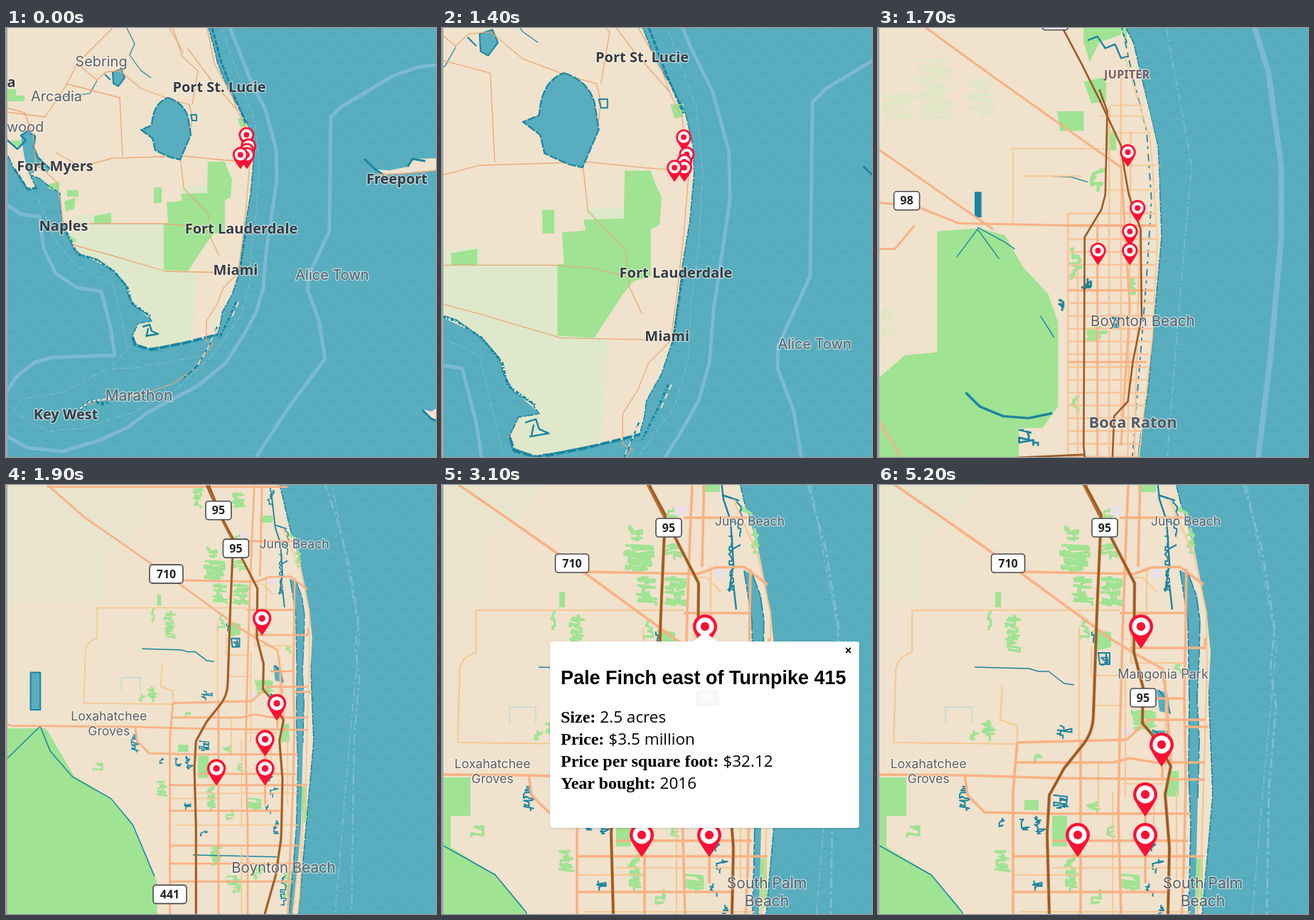
These frames come from a looping animation (605x603 px, 6 s). An HTML page with a canvas:

```html
<!DOCTYPE html>
<html lang="en">
<head>
<meta charset="utf-8">
<title>Map zoom</title>
<style>
html, body { margin: 0; width: 605px; height: 603px; overflow: hidden; background: #58adbf; }
canvas { position: absolute; left: 0; top: 0; }
#popup { position: absolute; left: 152px; top: 220px; width: 435px; height: 262px; background: #fff;
  border-radius: 4px; box-shadow: 0 1px 3px rgba(0,0,0,.15); opacity: 0; color: #000; }
#popup::before { content: ""; position: absolute; left: 200px; top: -14px;
  border: 18px solid transparent; border-top: 0; border-bottom: 15px solid #fff; }
h2 { position: absolute; left: 15px; top: 36px; margin: 0; white-space: nowrap;
  font: bold 27px/31px "Liberation Sans", Arial, sans-serif; }
p { position: absolute; left: 15px; top: 91px; margin: 0; white-space: nowrap;
  font: 24px/31px "Liberation Serif", Times, serif; }
p span { font: 22.5px/0 "Open Sans", sans-serif; }
#close { position: absolute; left: 415px; top: 3px; font: bold 16px/20px "Liberation Sans", Arial, sans-serif; }
#ghost { position: absolute; left: 205px; top: 68px; width: 33px; height: 23px; border-radius: 3px;
  background: #f7f7f7; color: #fff; text-align: center; font: 600 16px/23px "Noto Sans", sans-serif; }
</style>
</head>
<body>
<canvas id="map" width="605" height="603"></canvas>
<div id="popup">
  <div id="ghost">95</div>
  <div id="close">×</div>
  <h2>Pale Finch east of Turnpike 415</h2>
  <p><b>Size:</b> <span>2.5 acres</span><br><b>Price:</b> <span>$3.5 million</span><br>
  <b>Price per square foot:</b> <span>$32.12</span><br><b>Year bought:</b> <span>2016</span></p>
</div>
<script>
const ctx = document.getElementById('map').getContext('2d');
const popup = document.getElementById('popup');
const closeMark = document.getElementById('close');

const W = 605, H = 603, FOCUS = { x: 335, y: 164 };
const FAR = 0.0956, MID = 0.3413, NEAR = 1;
const LAND = '#f0e2cc', GREEN = '#9fe393', PALE = '#dfe8ca', SEA = '#58adbf', SHORE = '#1985a1';
const ORANGE = '#f9b184', YELLOW = '#f6c894', BROWN = '#9c5a26', LIMIT = '#7db9d2';

let k = 1;               // scale of the active layer
const useLayer = (scale, ref) => {
  k = scale / ref;
  ctx.setTransform(k, 0, 0, k, FOCUS.x * (1 - k), FOCUS.y * (1 - k));
};
const fill = (d, color) => { ctx.fillStyle = color; ctx.fill(new Path2D(d)); };
const line = (d, color, width, dash = []) => {
  ctx.strokeStyle = color;
  ctx.lineWidth = width / k;
  ctx.setLineDash(dash.map(v => v / k));
  ctx.stroke(new Path2D(d));
  ctx.setLineDash([]);
};
const random = seed => () => {
  seed = (seed * 16807 + 11) % 2147483647;
  return seed / 2147483647;
};

// Irregular patch filling a box: parks or ponds.
function patch(color, x, y, w, h) {
  const rnd = random(x * 977 + y * 131 + 7);
  const n = Math.max(4, Math.round(w * h / 50));
  let d = '';
  for (let i = 0; i < n; i++) {
    const px = x + rnd() * w, py = y + h * i / n;
    d += `${i ? 'L' : 'M'}${px} ${py}` + (rnd() < 0.5 ? `V${py + 5}` : `H${x + rnd() * w}`);
  }
  ctx.strokeStyle = color;
  ctx.lineWidth = color === GREEN ? 3.4 : 2;
  ctx.stroke(new Path2D(d));
}
const patches = (color, boxes) => boxes.split(' ').forEach(b => patch(color, ...b.split(',').map(Number)));

function drawSea() {
  ctx.setTransform(1, 0, 0, 1, 0, 0);
  ctx.fillStyle = SEA;
  ctx.fillRect(0, 0, W, H);
  ctx.strokeStyle = 'rgba(62,148,172,.18)';
  ctx.lineWidth = 2;
  ctx.beginPath();
  for (let row = 0; row < 44; row++)
    for (let x = -(row * 17 % 30); x < W; x += 30) {
      const y = row * 14 + 4;
      ctx.moveTo(x, y);
      ctx.quadraticCurveTo(x + 9, y + 6, x + 18, y + 1);
    }
  ctx.stroke();
}

function drawFar(showLimits) {
  if (showLimits) {
    line('M315 0L345 75L365 115L380 170L381 215L366 315L362 365L352 400L335 430L310 470L270 503L200 540L170 562L130 580L80 595L30 590L0 573', LIMIT, 5);
    line('M0 248L22 262L47 265L53 310L70 345L100 365L134 370L147 420L153 460L65 463L40 470L15 490L0 512', LIMIT, 5);
    line('M605 52L580 55L545 67L470 112L457 125L455 285L425 350V370L440 410L449 465L400 530L352 603', LIMIT, 5);
    line('M303 0L330 75L350 130L356 190L352 260L345 310L343 360L330 405L290 460L240 508L180 540L110 562L60 567L10 540L20 522L80 512L140 480L180 478L280 460', LIMIT, 1.3, [8, 3, 2, 3]);
    line('M45 240L70 300L100 335L150 358L160 400L172 450L150 475', LIMIT, 1.3, [8, 3, 2, 3]);
  }
  const coast = 'M-4 -4H284L292 25L298 50L312 85L328 112L340 135L347 165L348 190L344 235L338 270L333 310L328 345L318 375L304 400L302 415L298 430L280 437L250 442L225 447L200 451L180 443L178 432L186 415L205 412L198 402L182 392L172 375L168 360L152 342L128 325L104 318L94 308L86 292L80 275L77 255L76 232L60 222L48 212L34 206L42 224L32 229L12 200L3 180L-4 172Z';
  fill(coast, LAND);
  fill('M92 295L98 264L150 258L152 275L222 275V335L268 343L266 395L262 438L225 446L200 450L181 443L186 417L206 412L183 392L169 360L152 341L104 317Z', PALE);
  fill('M248 222H283V245H248ZM163 275H222V340L170 322Z', PALE);
  fill('M222 274H228L226 245L248 243L246 233L283 232L284 188H308L312 200L318 212L316 238L308 242V285L292 290L282 302L256 342L222 340Z', GREEN);
  fill('M208 224H219V246H208ZM86 228H102V237H86ZM124 264L148 260V275H124ZM2 86H14V95H26V103H2ZM58 220L75 216V229L60 226ZM82 244L98 238L96 254L84 258ZM326 127L338 126V138L330 140ZM7 158H24V166H10ZM86 290L100 298L90 304Z', GREEN);
  line('M290 0L302 45L322 98L338 135', SHORE, 3, [7, 2]);
  line(coast, SHORE, 1.6, [9, 2, 4, 1]);
  line('M338 280L332 320L328 350M324 385L314 408L300 436M80 276L100 318L128 326L152 342L171 365L176 386L203 405', SHORE, 3.2, [5, 2, 2, 3]);
  line('M178 434L182 446L204 452L250 443L298 431', SHORE, 4, [13, 3]);
  line('M192 420L202 417L205 426L214 430L196 433M200 422L198 432', SHORE, 2.4);
  fill('M21 151L30 145L41 152L39 168L45 182L62 198L58 203L36 191L40 203L32 206L26 182Z', SEA);
  line('M0 156L16 170L28 158L21 151L30 145L41 152L39 168L45 182L62 198', SHORE, 2.5);
  line('M12 198L30 226L44 225', SHORE, 3, [8, 2]);
  fill('M150 62L162 58L167 70L158 82L151 78Z', SEA);
  line('M139 65L147 73M150 62L162 58L167 70L158 82L151 78Z', SHORE, 2);
  line('M170 0L181 22L174 38L190 60L204 70M72 98L118 92L128 74', SHORE, 1.2);
  const roads = [
    'M0 112L26 119L38 150L42 190L70 215L77 245L80 275L220 275L255 278L285 285',
    'M95 305L150 320L225 342L318 344', 'M70 175L105 195L150 183L250 180L300 185L337 188',
    'M0 118L55 125L85 80L100 50L150 0M84 78L160 98L164 180', 'M100 50L128 73L140 62L160 60L190 85L225 98L258 108L262 125L258 155L245 180L250 225L285 262L288 295L300 320',
    'M235 0L248 40L270 60L262 108M255 28L290 75L325 115L337 140L343 190L338 250L331 310L326 345L306 365L296 390L282 412V440L292 445',
    'M230 0L250 35M283 0L293 50L318 95L325 115', 'M290 445L270 475L235 500L190 515L140 522L115 530'
  ];
  roads.forEach(d => line(d, '#eba877', 1.3));
  line('M297 420L286 447L270 474L250 492', SHORE, 2.4, [8, 4]);
  line('M296 423L284 450L268 476', LAND, 1.5, [8, 4]);
  line('M104 536L120 523L136 528L152 520', SHORE, 5, [4, 3]);
  line('M104 535L120 524L150 521', LAND, 2.5, [4, 3]);
  line('M327 385L316 410', LAND, 2, [8, 6]);
  const lake = 'M228 98Q250 105 256 125L260 150L245 185L232 182L210 172L206 155L190 143L205 137Q207 105 228 98Z';
  fill(lake, SEA);
  line(lake, SHORE, 2.2, [12, 2]);
  line('M260 122H268V130H262Z', SHORE, 2);
  const bahama = 'M504 184L520 199L540 200L565 195L572 184L605 183V200L580 202L548 205L528 208Z';
  fill(bahama, LAND);
  line('M504 184L520 199L532 207M565 195L572 184L590 187', SHORE, 3);
  line('M520 206L575 204L605 200', '#eba877', 1.3);
  fill('M587 536L598 539L605 535V553L595 545Z', LAND);
  line('M586 537L598 549L605 552', SHORE, 3);
}

function drawMid() {
  line('M371 -154L442 -11L462 0L490 90L503 185V260L492 380L475 520L463 603L446 703L431 881', LIMIT, 8);
  line('M355 -100L383 30L400 120L412 185L405 260L395 380L388 470L380 603L370 850', LIMIT, 1.8, [12, 4, 3, 4]);
  fill('M-250 -150H285L322 0L335 30L343 55L360 95L369 130L377 165L379 200L377 260L374 310L370 360L364 420L358 470L352 530L345 580L340 603L325 850H-250Z', LAND);
  fill('M0 295H153V375L75 405L50 380L0 330Z', '#eee3cb');
  patches('#e0e6c6', '130,78,40,60 180,95,30,40 90,110,40,30 60,330,50,30');
  fill('M-68 462H54V425L62 402L95 400L120 378L153 375V252L195 249L222 256L240 288L266 316L276 345V430L260 452H236V560L180 650L60 799H-68Z', GREEN);
  fill('M302 30L322 24L340 30V52L318 60L308 80L302 60ZM275 130H302V150H278ZM302 100L325 95V120L310 122ZM325 150H335V170H325Z', GREEN);
  patches(GREEN, '310,190,14,20 286,270,14,30 306,350,20,14 290,500,14,26 322,520,14,16 346,300,8,20 290,420,8,16');
  const lake = 'M-160 60L-100 -80L-20 -75L37 0L50 30L62 62L60 92L42 108L30 125L8 148L-20 158L-120 120Z';
  fill(lake, SEA);
  line(lake, SHORE, 1.2, [14, 2]);
  fill('M64 8L90 6L94 25L84 50H68Z', SEA);
  fill('M191 212H198V238H191ZM71 4H78V10H71Z', SHORE);
  line('M182 416L196 430L220 440L246 442L270 437', SHORE, 3.4);
  line('M173 278L194 250L216 280M194 248L220 262L232 270M268 196L290 197L306 202M0 235L20 206M258 338L272 360', SHORE, 1.4);
  line('M306 58L316 54L324 66L334 62L340 76L348 74', SHORE, 2.4);
  patches(SHORE, '236,454,20,18 276,322,8,8 300,300,10,12 302,484,12,12 330,340,10,12 295,550,16,14 325,495,8,14');
  line('M340 40L352 95L366 150L371 220L366 300L358 400L350 500L336 590', SHORE, 1.8, [10, 6, 4, 7]);

  let grid = '';
  for (let i = 0; i < 29; i++) {
    const y = 234 + i * 13;
    grid += `M${y > 482 ? 236 : 286} ${y}H${376 - Math.max(0, y - 300) * 0.1}`;
  }
  grid += 'M286 234V603M296 290V600M316 240V600M328 125V590M340 90V440M350 150L346 580M360 220L352 540M248 484V603M260 484V603M272 484V603';
  line(grid, '#f8c49a', 2.6);
  line('M228 168H325M230 170V245M318 135H362M330 124H364M326 152H370M340 185H380M240 196H300M325 210H378M344 75L370 160L377 260L372 360L356 500', YELLOW, 1.8);
  ['M62 -60L64 60L48 118L38 155L0 285', 'M52 140L210 250', 'M70 -10L100 15L210 95L340 187',
   'M-60 220L80 222L130 226L175 244L285 246H375', 'M0 232L60 240L80 270H110L130 246', 'M7 250V325L75 415L125 495L138 530L152 577L170 603',
   'M286 312H372M286 385H366M240 521H350M240 575H342M316 246V600M340 185L349 330L340 470'
  ].forEach(d => line(d, ORANGE, 3));
  ['M240 -40L258 0L275 35L300 82L318 118L340 165L343 187L348 215L360 250L361 340L352 385L347 425L333 440L331 490L318 540L305 603L290 850',
   'M318 108L326 130L324 215L320 230L303 258L302 470L306 515L280 560L277 603V850', 'M-60 575L152 577L180 583L205 592L235 548V482L303 479',
   'M205 592L198 603'
  ].forEach(d => line(d, BROWN, 2.6));
}

function drawNear(s) {
  const size = Math.pow(s, 0.8);
  line('M440 -300L494 -63L515 0L540 90L558 200L552 260L560 310L550 430L547 603L545 771L530 1000', '#7dbdd0', 3 * size, [14, 5, 4, 5]);
  const coast = 'M-230 -110H376L390 -63L414 0L430 38L445 90L455 140L463 185L468 235L465 290L463 410L458 420L457 525L452 603L430 780L425 900H-230Z';
  fill(coast, LAND);
  fill('M-230 172L0 165L62 160V75L110 45L145 0V-110H-230Z', '#e9e4cd');
  fill('M-230 411H-52L3 504L12 509L75 548L112 590L165 711V900H-230Z', GREEN);
  if (s > 0.78) fill('M-60 411H40V465H12V512H-60Z', GREEN);
  fill('M303 203L328 207V228L310 232L303 222ZM245 465H266V508H245ZM206 443H226V457H206ZM165 150H173V172H165ZM408 402H423V438H406ZM366 -4H391V10H366ZM447 525H457V590L448 600Z', GREEN);
  patches(GREEN, '262,57,22,20 256,85,42,34 316,34,18,16 315,82,24,20 273,130,32,36 312,130,34,40 153,178,10,26 180,182,20,52 283,190,14,26 356,316,36,28 146,330,18,28 130,345,14,16 165,515,20,30 262,520,20,50 340,548,28,22 292,446,20,14 40,478,20,14 320,480,14,18 300,570,16,20 220,380,12,10 415,250,12,14');
  patches(GREEN, '420,30,16,14 436,60,10,40 236,-60,20,40 310,-50,26,30 270,640,22,40 300,700,30,30 350,680,24,24 410,690,20,50');
  fill('M327 30H343V43H327ZM385 118H398V130H385ZM343 342H356V352H343Z', '#eadfe9');

  fill('M425 120L437 126L448 155L453 190L452 235L449 300L452 360L450 440L448 520L446 603L430 780L420 780L437 603L440 480L437 400L438 300L436 190Z', SEA);
  line('M425 120L436 190L438 300L437 400L440 480L437 603L424 770M437 126L448 155L453 190L452 235L449 300L452 360L450 440', SHORE, 1.6 * size, [20, 3, 8, 2]);
  line('M388 -50L396 20L406 50L410 110L404 150M394 14L418 22M406 50L420 56M409 90L420 84M410 140L414 175', SHORE, 2.4 * size);
  fill('M392 288L407 292L412 322L396 318ZM384 345H410V358H390ZM-82 302H-63V375H-82Z', SEA);
  line('M395 288L404 300L411 321M386 344L408 357M-82 302H-63V375H-82ZM310 236H326V252H312Z', SHORE, 2);
  patches(SHORE, '312,236,14,20 251,338,22,16 113,424,18,36 166,468,12,14 199,470,14,18 220,465,16,28 244,436,24,20 216,556,16,12 386,526,18,18 298,206,6,20 402,72,10,80 414,24,8,50 376,560,12,18 384,495,10,20');
  patches(SHORE, '380,-60,14,40 250,610,18,12 390,590,14,30 406,700,12,60');
  line('M136 256L212 258L226 262H240L262 279L276 281M-128 470L-63 407L-44 455L0 506L75 548L118 600L160 700M235 658L400 662', SHORE, 1.5);
  line('M95 312H132V336M95 312V336', '#a9d4df', 1);

  [ 'M48 176H340M48 176V235Q25 243 25 262L22 362L195 364', 'M175 283L172 330L196 338V362', 'M300 228V268H345M303 310H345M283 200V360',
    'M378 115V182M392 150L372 130H360M356 205V250H430M405 270V400M410 20L445 100L462 180L463 260L458 420L454 560L430 771',
    'M330 430V603M310 390V460M388 430V500M420 430V560M245 538H440M190 548H285M345 420H400M200 600H440M330 640V780M348 260V440'
  ].forEach(d => line(d, YELLOW, 2.2 * size));
  [ 'M-140 -140L-48 -63L24 0L85 42L185 112L330 218L360 236L400 258L406 300L412 390', 'M-50 -60H420M340 46H430M200 122L360 125L385 116L425 115L458 140',
    'M340 180H434M355 229H460V215', 'M195 362L350 358L380 330H460M195 390H330L355 384L390 390H460', 'M-230 362L-150 395L-120 406L120 408L250 412L460 414',
    'M122 408L126 436L150 460L240 462H440', 'M190 522H458M245 500H436M190 572H410M190 640H440M190 710H430M190 675H430',
    'M355 -63L350 46L345 180L340 360L338 462L342 603V780', 'M370 -60L366 115M434 118L431 300L433 420L430 540L420 780',
    'M196 362L190 430V780M285 360V780M376 455V560M400 395V415M378 180L370 229M386 300H432M432 340H465'
  ].forEach(d => line(d, ORANGE, 3.6 * size));
  ['M262 -63L290 0L361 138L360 235L373 285L372 335L385 350L412 395L404 435L410 510L408 603L407 628L397 697L376 771L350 900',
   'M266 -63L294 5L314 42L308 180L303 325Q302 350 286 368L262 398L241 436L238 490L241 603V900'
  ].forEach(d => {
    line(d, '#cf955f', 4.6 * size);
    line(d, BROWN, 3.2 * size);
  });
}

const CITY = ['600', '"Noto Sans", sans-serif', '#363c45'];
const SOFT_CITY = ['600', '"Noto Sans", sans-serif', '#555b64'];
const TOWN = ['400', 'Inter, sans-serif', '#59616b'];
const DISTRICT = ['600', '"Noto Sans", sans-serif', '#7d5a60'];

function label(text, x, y, size, [weight, family, color]) {
  ctx.font = `${weight} ${size}px ${family}`;
  ctx.lineWidth = 3;
  ctx.strokeStyle = 'rgba(255,250,242,.5)';
  ctx.fillStyle = color;
  const rows = text.split('\n');
  rows.forEach((row, i) => {
    const rowY = y + (i - (rows.length - 1) / 2) * size * 1.2;
    ctx.strokeText(row, x, rowY);
    ctx.fillText(row, x, rowY);
  });
}
function shield(text, x, y) {
  const w = text.length * 11 + 14;
  ctx.beginPath();
  ctx.roundRect(x - w / 2, y - 13, w, 26, 4);
  ctx.fillStyle = '#fff';
  ctx.fill();
  ctx.strokeStyle = '#4a4a4a';
  ctx.lineWidth = 1.6;
  ctx.stroke();
  ctx.font = '600 16px "Noto Sans", sans-serif';
  ctx.fillStyle = '#222';
  ctx.fillText(text, x, y + 1);
}

const farLabels = [
  ['Sebring', 134, 48, 20, TOWN], ['Arcadia', 71, 97, 20, TOWN], ['Englewood', 1, 140, 20, TOWN],
  ['Alice Town', 459, 348, 20, TOWN], ['Marathon', 187, 518, 21, TOWN], ['Sarasota', -30, 77, 20, CITY],
  ['Port St. Lucie', 300, 84, 20, CITY], ['Fort Myers', 69, 195, 20, CITY], ['Naples', 81, 279, 20, CITY],
  ['Fort Lauderdale', 331, 283, 20, CITY], ['Miami', 323, 341, 20, CITY], ['Freeport', 550, 213, 20, CITY],
  ['Key West', 84, 544, 20, CITY]
];
const midLabels = [
  ['Indiantown', 133, 35, 21, TOWN], ['Pahokee', 33, 162, 17, TOWN], ['Boynton Beach', 362, 344, 20.5, TOWN],
  ['JUPITER', 346, 93, 16.5, DISTRICT], ['BELLE GLADE', 33, 246, 16.5, DISTRICT],
  ['Boca Raton', 352, 447, 22, SOFT_CITY], ['Fort Lauderdale', 319, 592, 22.3, SOFT_CITY]
];
const midShields = [['95', 273, 38], ['98', 122, 221], ['27', 53, 391], ['27', 135, 509]];
const nearLabels = [['Juno Beach', 433, 52, 17.5, TOWN], ['Loxahatchee\nGroves', 71, 403.5, 17.7, TOWN]];
const nearShields = [['95', 319, 60], ['710', 183, 110], ['95', 285, -14], ['441', 190, 735]];
const pins = [[370, 230], [399, 396], [376, 466], [376, 523], [281, 523]];

function drawLabels(s) {
  const place = (draw, items, ref) => items.forEach(([text, x, y, ...rest]) => {
    const r = s / ref;
    draw(text, FOCUS.x + (x - FOCUS.x) * r, FOCUS.y + (y - FOCUS.y) * r, ...rest);
  });
  if (s < 0.18) return place(label, farLabels, FAR);
  if (s < 0.5) {
    place(label, midLabels, MID);
    return place(shield, midShields, MID);
  }
  place(label, nearLabels, NEAR);
  place(shield, nearShields, NEAR);
  if (s < 0.93) return place(label, [['Boynton Beach', 412, 684, 20.5, TOWN]], NEAR);
  place(label, [['Mangonia Park', 401, 267, 18, TOWN], ['South Palm\nBeach', 457, 573.5, 21, TOWN]], NEAR);
  place(shield, [['95', 373, 299]], NEAR);
}

// The tip of the pin is the anchor.
function drawPin(x, y, width) {
  const r = width / 2, cy = y - r * 1.83;
  const disc = (radius, color) => {
    ctx.beginPath();
    ctx.arc(x, cy, radius, 0, Math.PI * 2);
    ctx.fillStyle = color;
    ctx.fill();
  };
  ctx.beginPath();
  ctx.arc(x, cy, r, Math.PI * 0.85, Math.PI * 2.15);
  ctx.quadraticCurveTo(x + r * 0.6, cy + r * 1.0, x, y);
  ctx.quadraticCurveTo(x - r * 0.6, cy + r * 1.0, x - r * 0.89, cy + r * 0.45);
  ctx.fillStyle = '#ff1034';
  ctx.fill();
  disc(r * 0.74, '#fff');
  disc(r * 0.36, '#ff1034');
}

// The CSS "ease" curve, solved for its parameter by bisection.
function ease(x) {
  let lo = 0, hi = 1;
  for (let i = 0; i < 24; i++) {
    const m = (lo + hi) / 2;
    if (0.75 * m * (1 - m) + m ** 3 < x) lo = m; else hi = m;
  }
  return 0.3 * lo * (1 - lo) ** 2 + 3 * (1 - lo) * lo * lo + lo ** 3;
}
function scaleAt(t) {
  if (t <= 1200) return FAR;
  if (t >= 2300) return NEAR;
  return FAR ** (1 - ease((t - 1224) / 1195));
}

function drawMap(s) {
  drawSea();
  ctx.lineJoin = 'round';
  useLayer(s, FAR);
  drawFar(s < 0.18);
  if (s >= 0.18) { useLayer(s, MID); drawMid(); }
  if (s >= 0.5) { useLayer(s, NEAR); drawNear(s); }
  ctx.setTransform(1, 0, 0, 1, 0, 0);
  ctx.textAlign = 'center';
  ctx.textBaseline = 'middle';
  drawLabels(s);
  const zoomed = Math.max(0, Math.log2(s) / 1.55 + 1);
  const width = 22 + 12 * zoomed ** 2.75;
  pins.forEach(([x, y]) => drawPin(FOCUS.x + (x - FOCUS.x) * s, FOCUS.y + (y - FOCUS.y) * s, width));
  ctx.fillStyle = '#a6a6a6';
  ctx.fillRect(0, 0, 2, H);
}

let shownScale = 0;
const start = performance.now();
function tick() {
  const t = Math.floor(Math.max(0, performance.now() - start) % 6000 / 100) * 100;
  const s = scaleAt(t);
  if (s !== shownScale) drawMap(shownScale = s);
  popup.style.opacity = t < 3100 || t >= 5200 ? 0 : t < 5100 ? 1 : 0.5;
  closeMark.style.color = t < 4800 ? '#000' : '#222';
  requestAnimationFrame(tick);
}
tick();
</script>
</body>
</html>
```
